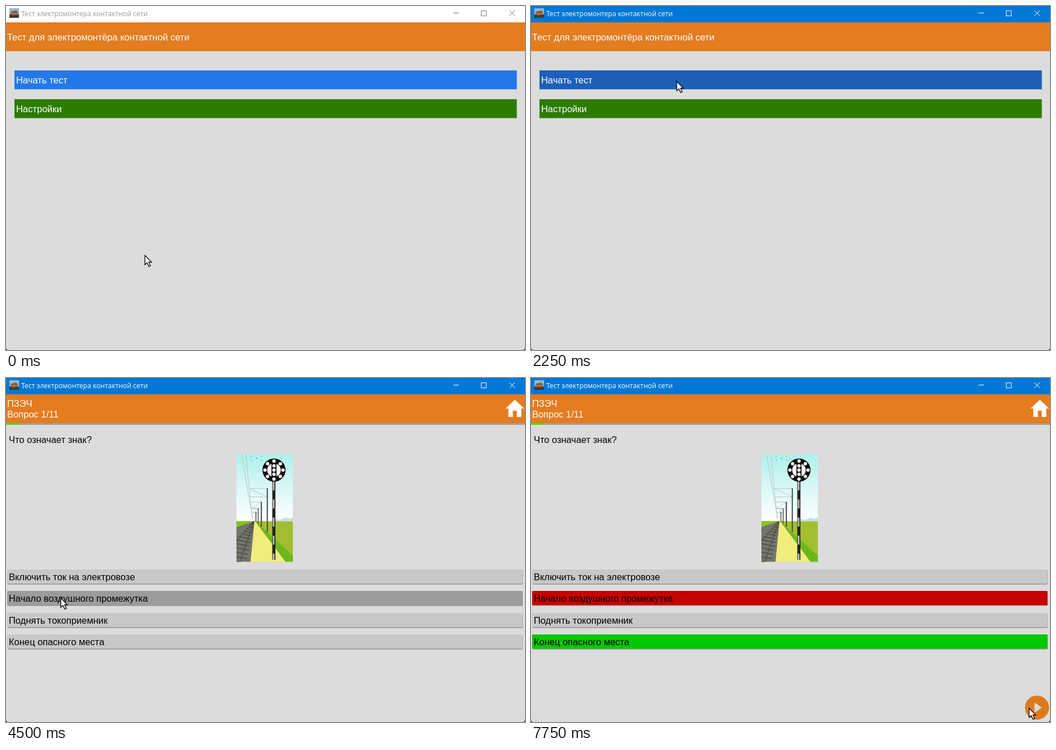
Write an HTML page that moves like this. It is 919x609 px and loops after 8 s.

```html
<!DOCTYPE html>
<html lang="ru">
<head>
<meta charset="utf-8">
<style>
html, body { margin: 0; width: 100%; height: 100%; overflow: hidden; background: #dcdcdc; }
svg { display: block; }
text { font: 16.45px "Liberation Sans", Arial, sans-serif; white-space: pre; }
.light text { fill: #fff; }
#caption { font: 12.1px "Open Sans", sans-serif; }
</style>
</head>
<body>
<svg width="919" height="609" viewBox="0 0 919 609">
  <defs>
    <linearGradient id="sky" x2="0" y2="1">
      <stop stop-color="#aef1ec"/><stop offset=".45" stop-color="#d6f7f5"/><stop offset="1" stop-color="#fff"/>
    </linearGradient>
    <clipPath id="photo"><path d="M408 135h100v190.500h-100z"/></clipPath>
  </defs>
  <path fill="#dcdcdc" d="M0 0h919v609H0z"/>

  <g id="titlebar">
    <path id="titleBack" d="M0 0h919v29H0z"/>
    <path fill="#8fb9cd" d="M6 4h17v17H6z"/>
    <path fill="#3c3d35" d="M6 15h17v6H6z"/>
    <path fill="#8d563c" d="M9 10l9-2 3 3v5l-10 1-3-3z"/>
    <path fill="#c9a274" d="M9 13h11v1H9z"/>
    <text id="caption" x="27" y="17.500">Тест электромонтера контактной сети</text>
    <path id="controls" fill="none" d="M792 12.500h10M841.500 8.500h9v9h-9zM891.500 8l9.500 9.500m0-9.500l-9.500 9.500"/>
  </g>
  <path fill="#e47c20" d="M0 29h919v51H0z"/>

  <g id="menu" class="light">
    <text x="2" y="61">Тест для электромонтёра контактной сети</text>
    <path id="start" d="M15 114h889.500v33.500H15z"/>
    <text x="18" y="137">Начать тест</text>
    <path fill="#2c7c00" d="M15 165h889.500v33.500H15z"/>
    <text x="18" y="188">Настройки</text>
  </g>

  <g id="quiz">
    <g class="light">
      <text x="2" y="51">ПЗЭЧ</text>
      <text x="2" y="70">Вопрос 1/11</text>
    </g>
    <path fill="#fff" d="M901 38.500l16.500 15.500h-5v15h-8v-11h-7v11h-8v-15h-5z"/>
    <path fill="#a0a0a0" d="M0 80h919v3H0z"/>
    <path fill="#46e010" d="M0 80h24v3H0z"/>
    <text x="5" y="115">Что означает знак?</text>

    <g clip-path="url(#photo)">
      <path fill="url(#sky)" d="M408 135h100v119h-100z"/>
      <path fill="#c3dfe8" d="M470 253l8-3 8 1 9-4 7 2 6-2v6z"/>
      <path fill="#a2be30" d="M408 253.500h100v72h-100z"/>
      <path fill="#84c522" d="M408 253.500h33l-33 20z"/>
      <path fill="#74756c" d="M408 264l31-10.500h2l-8 72h-25z"/>
      <path fill="none" stroke="#393a35" d="M438 254l-30 35m31-35l-25 71"/>
      <path id="sleepers" fill="none" stroke="#4c4a42" stroke-width="1.500"/>
      <path fill="#f1ed7b" d="M440 253.500h1.500l54 72H433z"/>
      <path fill="#6cb81c" d="M441 253.500l67 61v11h-13z"/>
      <path fill="none" stroke="#b0b8ba" stroke-width=".8" d="M417 135l20 115M424.500 135l11.500 113M431 195.500h32m-31 15h31l-31-14M434 219.500h18l-17 11h17M436 231.500h11l-10 7h10M438 238.500h5"/>
      <path fill="none" stroke="#464a48" stroke-width="2" d="M462.700 195v78M452.200 219v44"/>
      <path fill="none" stroke="#4b5140" stroke-width="1.500" d="M446.500 231v27M442.500 237v18"/>
      <path fill="none" stroke="#333" stroke-dasharray="1.200 9" d="M433 139l25 8m-24-1l20-8"/>
      <path fill="none" stroke="#222" stroke-width="5.500" d="M474.300 183v139"/>
      <path fill="none" stroke="#c4c4bd" stroke-width="2.800" stroke-dasharray="16" d="M473.900 183v139"/>
      <circle cx="474.500" cy="163" r="20.500" fill="#0c0c0c"/>
      <circle cx="474.500" cy="163" r="12" fill="#fff"/>
      <path fill="#0c0c0c" d="M470 150h9v26h-9z"/>
      <g id="lamps" fill="#fff"></g>
    </g>

    <g id="answers"></g>
    <g id="next">
      <circle id="nextBack" cx="896" cy="583.500" r="21.300"/>
      <path fill="#dedede" d="M891.500 574.500l13 9-13 9z"/>
    </g>
  </g>

  <path fill="#222" d="M0 604.500q0 4.500 4.500 4.500H0zM919 604.500q0 4.500-4.500 4.500h4.500z"/>
  <path id="cursor" fill="#fff" stroke="#000" stroke-width="1.300" d="M1 .500v16.500l3.800-3.500 3.200 6.700 2.800-1.300-3-6.400h5z"/>
</svg>
<script>
const $ = id => document.getElementById(id);
const LOOP = 8000, STEP = 250;

const options = ['Включить ток на электровозе', 'Начало воздушного промежутка',
  'Поднять токоприемник', 'Конец опасного места'];
$('answers').innerHTML = options.map((label, i) => {
  const y = Math.round(339 + i * 38.3);
  return `<rect x="3" y="${y + 2}" width="912" height="24.500" rx="1" fill="#929292"/>
    <rect class="row" x="2" y="${y}" width="912.5" height="25" rx="1"/>
    <text x="5" y="${y + 19}">${label}</text>`;
}).join('');
const rows = document.querySelectorAll('.row');

const dot = (x, y) => `<circle cx="${x}" cy="${y}" r="3"/>`;
let lamps = [-7.5, 0, 7.5].map(d => dot(474.5, 163 + d)).join('');
for (let i = 0; i < 8; i++) {
  const a = i * Math.PI / 4;
  lamps += dot(474.5 + 16 * Math.cos(a), 163 + 16 * Math.sin(a));
}
$('lamps').innerHTML = lamps;

let sleepers = '';
for (let i = 1; i < 15; i++) {
  const d = 72 * (i / 14) ** 1.6;
  sleepers += `M${438 - d * .9} ${254 + d * .9}L${440 - d * .2} ${256 + d}`;
}
$('sleepers').setAttribute('d', sleepers);

// Pointer path: time, x, y
const path = [
  [0, 245, 441], [250, 238, 405], [500, 222, 335], [750, 217, 262], [1000, 227, 195],
  [1250, 250, 148], [1500, 257, 133], [2750, 257, 133], [3000, 250, 150], [3500, 167, 287],
  [4000, 95, 379], [4250, 96, 389], [5000, 96, 389], [5250, 787, 524], [5500, 835, 548],
  [5750, 872, 566], [6000, 884, 574], [6750, 884, 574], [7000, 866, 580], [7250, 838, 587],
  [7500, 826, 589], [7750, 881, 584]
];

function pointerAt(t) {
  const i = path.findIndex(p => p[0] >= t);
  if (i < 1) return path[0].slice(1);
  const [t0, x0, y0] = path[i - 1], [t1, x1, y1] = path[i];
  const k = (t - t0) / (t1 - t0);
  return [x0 + (x1 - x0) * k, y0 + (y1 - y0) * k];
}

const show = (id, on) => $(id).style.display = on ? '' : 'none';
const fill = (el, color) => el.setAttribute('fill', color);

function draw(t) {
  const active = t >= 2250, quiz = t >= 2500, chosen = t >= 4750, checked = t >= 6500;
  fill($('titleBack'), active ? '#0078d7' : '#fff');
  fill($('caption'), active ? '#fff' : '#999');
  $('controls').setAttribute('stroke', active ? '#fff' : '#777');
  show('menu', !quiz);
  show('quiz', quiz);
  show('next', chosen);
  fill($('start'), active ? '#1c60b9' : '#2379e8');

  const picked = checked ? '#c80000' : chosen ? '#3c39ef' : t >= 4500 ? '#9c9c9c' : '#c8c8c8';
  rows.forEach((row, i) =>
    fill(row, i === 1 ? picked : i === 3 && checked ? '#00c800' : '#c8c8c8'));
  fill($('nextBack'), !checked ? '#3c3cf0' : t < 6750 ? '#b8651b' : '#dd7a1e');
  $('cursor').setAttribute('transform', `translate(${pointerAt(t)})`);
}

const begin = performance.now();
function tick() {
  const t = (performance.now() - begin) % LOOP;
  draw(Math.floor(t / STEP) * STEP);
  requestAnimationFrame(tick);
}
tick();
</script>
</body>
</html>
```
